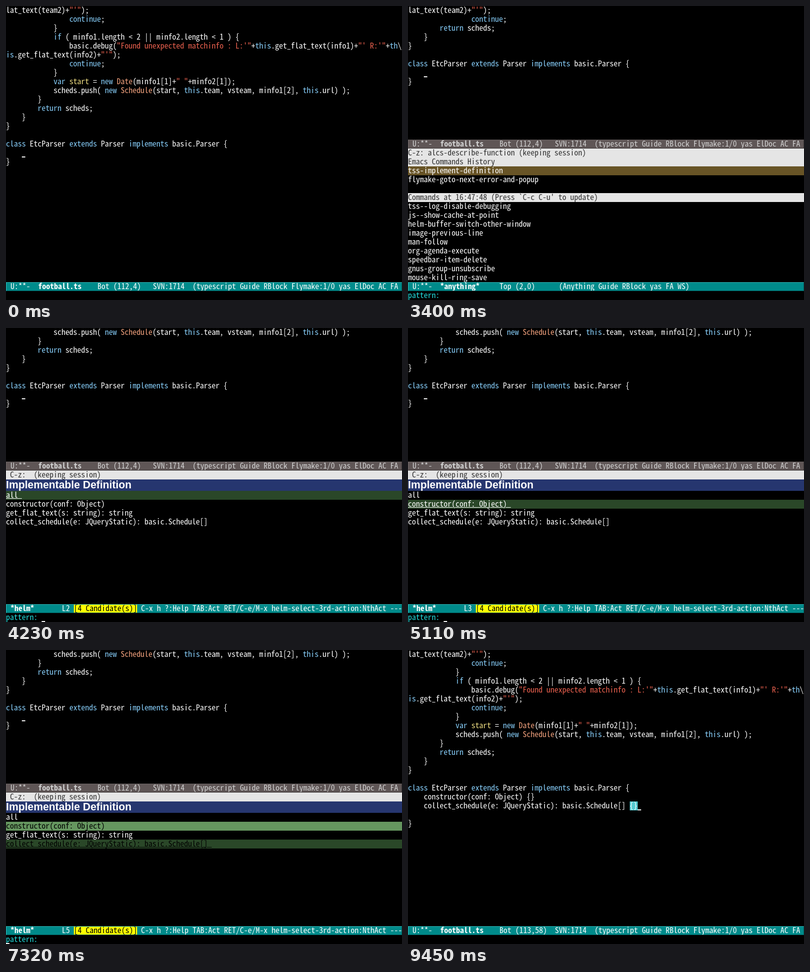
Write an HTML page that moves like this. It is 800x594 px and loops after 9900 ms.

```html
<!DOCTYPE html>
<html lang="en">
<head>
<meta charset="utf-8">
<title>Editor session</title>
<style>
html, body { margin: 0; width: 100%; height: 100%; overflow: hidden; background: #000; }
#stage {
  position: relative; width: 800px; height: 594px; overflow: hidden;
  font: calc(40px / 3)/18px "Noto Sans Mono", monospace;
  white-space: pre; color: #fff;
}
/* Tall half-width glyphs on the baseline of the surrounding line. */
#stage span {
  font: 16px/0 "Noto Sans Mono CJK JP", "Noto Sans Mono CJK SC", "Noto Sans Mono", monospace;
  font-size-adjust: ch-width 0.5;
  font-variant-ligatures: none;
}
pre { margin: 0; font: inherit; }
i { font-style: normal; }
.layer { position: absolute; inset: 0; background: #000; }
.code { position: absolute; left: 0; top: 0; }
.k { color: #87cefa; }
.s { color: #e9604e; }
.v { color: #eedd82; }
.t { color: #f0a07c; }
.field { position: absolute; left: 448px; top: 306px; width: 16px; height: 18px; background: #52c8cf; }

.mode {
  position: absolute; left: 0; top: 558px; width: 800px; height: 18px; box-sizing: border-box;
  border: 1px solid; border-color: #33b5b5 #005858 #005858 #33b5b5;
  background: #008b8b; line-height: 16px; overflow: hidden;
}
.mode.idle {
  top: 270px; background: #5f5656; color: #d0d0d0;
  border-color: #6c6464 #393434 #393434 #6c6464;
}
.mode div { position: absolute; top: 0; height: 16px; overflow: hidden; }
.mode .num { left: 120px; }
.mode .count { left: 136px; background: #ff0; color: #000; }
.num i { display: block; }

.cursor { position: absolute; width: 7px; height: 2px; background: #fff; }
.pane { position: absolute; left: 0; top: 288px; width: 800px; height: 270px; background: #000; }
.pane div { height: 18px; }
.pane .head { background: #e5e5e5; color: #333; }
.pane .pick { background: #685426; }
.pane .title {
  height: 23px; background: #26366f;
  font: bold 21.33px/23px "Liberation Sans", Arial, sans-serif;
}
.item { text-decoration: underline 1px transparent; }
.prompt { position: absolute; left: 0; top: 576px; color: #22dddd; }

.anim { animation: 9900ms step-end infinite; }
#split { animation-name: split; }
#helm, #helmMode { animation-name: helm; }
#done { animation-name: done; }
#blinkA { left: 32px; top: 304px; animation-name: blinkA; }
#blinkB { left: 464px; top: 322px; animation-name: blinkB; }
#still { left: 32px; top: 142px; }
#mini { left: 72px; top: 592px; animation-name: mini; }
#all { animation-name: all; }
#ctor { animation-name: ctor; }
#flat { animation-name: flat; }
#sched { animation-name: sched; }
#line { animation-name: line; }

@keyframes split {
  0% { clip-path: inset(0 0 594px 0); }
  19.595% { clip-path: inset(0 0 486px 0); }
  23.03% { clip-path: inset(0 0 306px 0); }
  24.343% { clip-path: inset(0 0 0 0); }
  34.343% { clip-path: inset(36px 0 0 0); }
  37.676% { clip-path: inset(0 0 594px 0); }
  42.727% { clip-path: inset(0 0 0 0); }
  80.404% { clip-path: inset(36px 0 0 0); }
  80.808%, 100% { clip-path: inset(0 0 594px 0); }
}
@keyframes helm { 0% { opacity: 0; } 37.676%, 100% { opacity: 1; } }
@keyframes done { 0% { opacity: 0; } 80.404%, 100% { opacity: 1; } }
@keyframes blinkA {
  0%, 4.949%, 15.05%, 100% { opacity: 1; }
  .505%, 10% { opacity: 0; }
}
@keyframes blinkB {
  0%, 90.505% { opacity: 0; }
  85.454%, 95.454%, 100% { opacity: 1; }
}
@keyframes mini {
  0% { opacity: 1; transform: none; }
  29.191%, 34.343% { opacity: 0; }
  33.838%, 42.727% { opacity: 1; }
  73.939%, 100% { opacity: 1; transform: translateX(-72px); }
}
@keyframes all {
  0% { background: #2a4728; text-decoration-color: #fff; }
  51.616%, 100% { background: #000; text-decoration-color: transparent; }
}
@keyframes ctor {
  0% { background: #000; color: #fff; text-decoration-color: transparent; }
  51.616% { background: #2a4728; color: #fff; text-decoration-color: #fff; }
  55.151%, 100% { background: #65965f; color: #000; text-decoration-color: transparent; }
}
@keyframes flat {
  0%, 59.191%, 100% { background: #000; text-decoration-color: transparent; }
  55.151% { background: #2a4728; text-decoration-color: #fff; }
}
@keyframes sched {
  0% { background: #000; color: #fff; text-decoration-color: transparent; }
  59.191% { background: #2a4728; color: #fff; text-decoration-color: #fff; }
  63.939%, 100% { background: #2a4728; color: #000; text-decoration-color: #000; }
}
@keyframes line {
  0% { transform: none; }
  51.616% { transform: translateY(-16px); }
  55.151% { transform: translateY(-32px); }
  59.191%, 100% { transform: translateY(-48px); }
}
</style>
</head>
<body>
<div id="stage"></div>
<script>
const before = `lat_text(team2)+"'");
                continue;
            }
            if ( minfo1.length < 2 || minfo2.length < 1 ) {
                basic.debug("Found unexpected matchinfo : L:'"+this.get_flat_text(info1)+"' R:'"+th\\
is.get_flat_text(info2)+"'");
                continue;
            }
            var start = new Date(minfo1[1]+" "+minfo2[1]);
`;
const after = `            scheds.push( new Schedule(start, this.team, vsteam, minfo1[2], this.url) );
        }
        return scheds;
    }
}

class EtcParser extends Parser implements basic.Parser {
`;
const empty = `
}`;
const filled = `    constructor(conf: Object) {}
    collect_schedule(e: JQueryStatic): basic.Schedule[] {}

}`;

const mono = html => `<span>${html}</span>`;
const tag = (cls, text) => `<i class="${cls}">${text}</i>`;

const syntax = /("[^"]*")|\b(var|new) (\w+)|\b(?:class|extends|implements|if|continue|return|this)\b|^is\b|\bth(?=\\)/gm;

function paint(text) {
  return text.replace(/</g, "&lt;").replace(syntax, (all, str, word, name) =>
    str ? tag("s", str)
    : word ? tag("k", word) + " " + tag(word === "var" ? "v" : "t", name)
    : tag("k", all));
}

const code = text => `<pre class="code">${mono(paint(text))}</pre>`;
const cursor = (id, cls = "") => `<div id="${id}" class="cursor ${cls}"></div>`;
const mode = (html, cls = "", id = "", extra = "") =>
  `<div class="mode ${cls}" id="${id}">${mono(html)}${extra}</div>`;
const rows = (list, cls = "") => list.map(s => `<div class="${cls}">${mono(s)}</div>`).join("");
const item = (id, text) => `<div id="${id}" class="item anim">${mono(text + " ")}</div>`;

const fileMode = pos => ` U:**-  <b>football.ts</b>    ${("Bot " + pos).padEnd(14)}` +
  "SVN:1714  (typescript Guide RBlock Flymake:1/0 yas ElDoc AC FA";

const editing = `<div class="layer">` + code(before + after + empty) +
  cursor("blinkA", "anim") + mode(fileMode("(112,4)")) + `</div>`;

const finished = `<div class="layer anim" id="done"><div class="field"></div>` +
  code(before + after + filled) +
  cursor("blinkB", "anim") + mode(fileMode("(113,58)")) + `</div>`;

const commands = `<div class="pane">` +
  rows(["C-z: alcs-describe-function (keeping session)", "Emacs Commands History"], "head") +
  rows(["tss-implement-definition"], "pick") +
  rows(["flymake-goto-next-error-and-popup", ""]) +
  rows(["Commands at 16:47:48 (Press `C-c C-u' to update)"], "head") +
  rows(["tss--log-disable-debugging", "js--show-cache-at-point", "helm-buffer-switch-other-window",
    "image-previous-line", "man-follow", "org-agenda-execute", "speedbar-item-delete",
    "gnus-group-unsubscribe", "mouse-kill-ring-save"]) + `</div>` +
  mode(" U:**-  <b>*anything*</b>     Top (2,0)      (Anything Guide RBlock yas FA WS)");

const helmKeys = "C-x h ?:Help TAB:Act RET/C-e/M-x helm-select-3rd-action:NthAct ---";

const helm = `<div class="pane anim" id="helm">` +
  rows([" C-z:  (keeping session)"], "head") +
  `<div class="title">Implementable Definition</div>` +
  item("all", "all") +
  item("ctor", "constructor(conf: Object)") +
  item("flat", "get_flat_text(s: string): string") +
  item("sched", "collect_schedule(e: JQueryStatic): basic.Schedule[]") + `</div>` +
  mode(" <b>*helm*</b>       L" + " ".repeat(19) + helmKeys, "anim", "helmMode",
    `<div class="num"><i id="line" class="anim">${mono("2\n3\n4\n5")}</i></div>` +
    `<div class="count">${mono("[4 Candidate(s)]")}</div>`);

const split = `<div class="layer anim" id="split">` + code(after + empty) + cursor("still") +
  mode(fileMode("(112,4)"), "idle") + commands + helm +
  `<div class="prompt">${mono("pattern:")}</div>` + cursor("mini", "anim") + `</div>`;

document.getElementById("stage").innerHTML = editing + finished + split;
</script>
</body>
</html>
```
